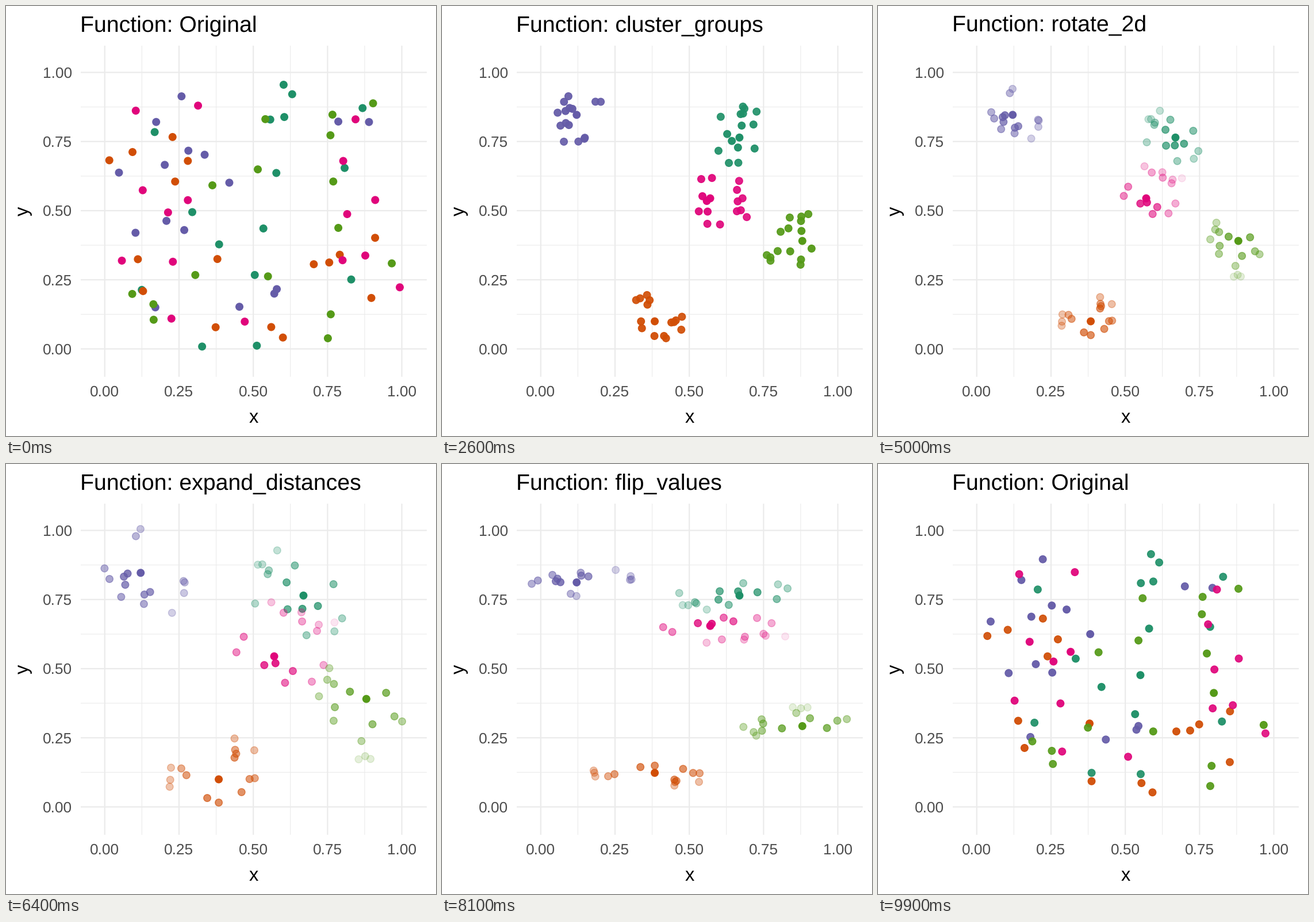
Recreate the animation shown at these times as a matplotlib script. Size 748 by 748 pixels, loop 10000 ms.

```python
import numpy as np
import matplotlib.pyplot as plt
from matplotlib.animation import FuncAnimation
from matplotlib.colors import to_rgba

SIZE, DPI = 748, 100
PT = 72 / DPI                          # points per pixel
UNIT = np.array([516.7, -481.0])       # pixels per data unit
ZERO = np.array([171.8, 596.5])        # pixel position of (0, 0)
PANEL = (130, 732, 69, 645)
FRAMES, INTERVAL, STEPS = 100, 100, 8

PER_GROUP = 16
COLOURS = ["#1f9068", "#d14e06", "#655ca8", "#e0057b", "#559a18"]
# Where the lower left corner of each group's shrunken unit square lands.
CORNERS = np.array([(0.5768, 0.6707), (0.3183, 0.0298), (0.0485, 0.7171),
                    (0.5222, 0.4288), (0.7450, 0.2963)])
SHRINK = np.array([0.1725, 0.2152])
TURN = np.radians(60)
GROWTH = 2.1

NAMES = ["Original", "cluster_groups", "dim_values", "rotate_2d",
         "expand_distances", "flip_values"]
STARTS = [9, 26, 43, 60, 77, 93]       # first moving frame of each change


def uniform(seed, count):
    """Uniform numbers from a Mersenne Twister with LCG-scrambled state."""
    state = []
    for _ in range(51 + 624):
        seed = (69069 * seed + 1) % 2**32
        state.append(seed)
    rng = np.random.RandomState()
    rng.set_state(("MT19937", np.array(state[51:], dtype=np.uint32), 624))
    return rng.randint(0, 2**32, count, dtype=np.uint32) / 2**32


def most_centred(points):
    """For each group, the point nearest to the group's mean."""
    away = np.linalg.norm(points - points.mean(1, keepdims=True), axis=2)
    nearest = away.argmin(1)[:, None, None]
    return np.take_along_axis(points, nearest, axis=1)


# Every stage is an array of shape (group, point, xy) in data units.
groups = len(COLOURS)
start = uniform(3, 2 * groups * PER_GROUP).reshape(2, groups, PER_GROUP)
start = np.moveaxis(start, 0, 2)
cluster = CORNERS[:, None] + SHRINK * start
origin = most_centred(cluster)
offset = cluster - origin
c, s = np.cos(TURN), np.sin(TURN)
spin = offset @ np.array([[c, s], [-s, c]])
grown = origin + GROWTH * spin
flipped = grown.copy()
flipped[..., 1:] = 2 * most_centred(grown[..., 1:]) - grown[..., 1:]

stages = [start, cluster, cluster, origin + spin, grown, flipped]
places = [ZERO + p.reshape(-1, 2) * UNIT for p in stages]

dim = 1 / (1 + np.linalg.norm(offset, axis=2).ravel()) ** 2
faded = 0.1 + 0.9 * (dim - dim.min()) / (1 - dim.min())
alphas = [np.ones_like(faded)] * 2 + [faded] * 4

plt.rcParams["font.family"] = "Liberation Sans"
plt.rcParams["text.hinting"] = "none"
fig = plt.figure(figsize=(SIZE / DPI, SIZE / DPI), dpi=DPI, facecolor="white")
ax = fig.add_axes([0, 0, 1, 1])
ax.set_xlim(0, SIZE)
ax.set_ylim(SIZE, 0)
ax.axis("off")


def label(x, y, text, px, **kw):
    return ax.text(x, y, text, fontsize=px * PT, va="baseline", **kw)


def grid(values, width):
    left, right, top, bottom = PANEL
    style = dict(color="#ebebeb", lw=width * PT, zorder=1, snap=False,
                 solid_capstyle="butt")
    for v in values:
        x, y = ZERO + v * UNIT
        ax.plot([x, x], [top, bottom], **style)
        ax.plot([left, right], [y, y], **style)


ticks = np.linspace(0, 1, 5)
grid(ticks[:-1] + 0.125, 1.1)
grid(ticks, 2.2)
for v in ticks:
    x, y = ZERO + v * UNIT
    label(x, 679, f"{v:.2f}", 26.2, color="#4d4d4d", ha="center")
    label(115.5, y + 9, f"{v:.2f}", 26.2, color="#4d4d4d", ha="right")
label(430.5, 725, "x", 32.7, ha="center")
label(39.5, 357, "y", 32.7, ha="center", rotation=90, rotation_mode="anchor")
title = label(129.5, 44.5, "", 39.3, ha="left")

rgba = np.repeat([to_rgba(colour) for colour in COLOURS], PER_GROUP, axis=0)
dots = ax.scatter(*places[0].T, s=(12.5 * PT) ** 2, c=rgba,
                  linewidths=1.45 * PT, zorder=3, snap=False)


def progress(frame):
    """Current stage and how far it has moved to the next one."""
    stage = sum(frame >= first for first in STARTS) - 1
    if stage < 0:
        return 0, 0.0
    return stage, min((frame - STARTS[stage] + 1) / STEPS, 1.0)


def draw(frame):
    a, t = progress(frame)
    b = (a + 1) % len(NAMES)
    dots.set_offsets((1 - t) * places[a] + t * places[b])
    rgba[:, 3] = (1 - t) * alphas[a] + t * alphas[b]
    dots.set_facecolor(rgba)
    dots.set_edgecolor(rgba)
    title.set_text("Function: " + NAMES[b if t > 0.5 else a])
    return dots, title


anim = FuncAnimation(fig, draw, frames=FRAMES, interval=INTERVAL,
                     repeat=True, repeat_delay=0, blit=False)
plt.show()
```
